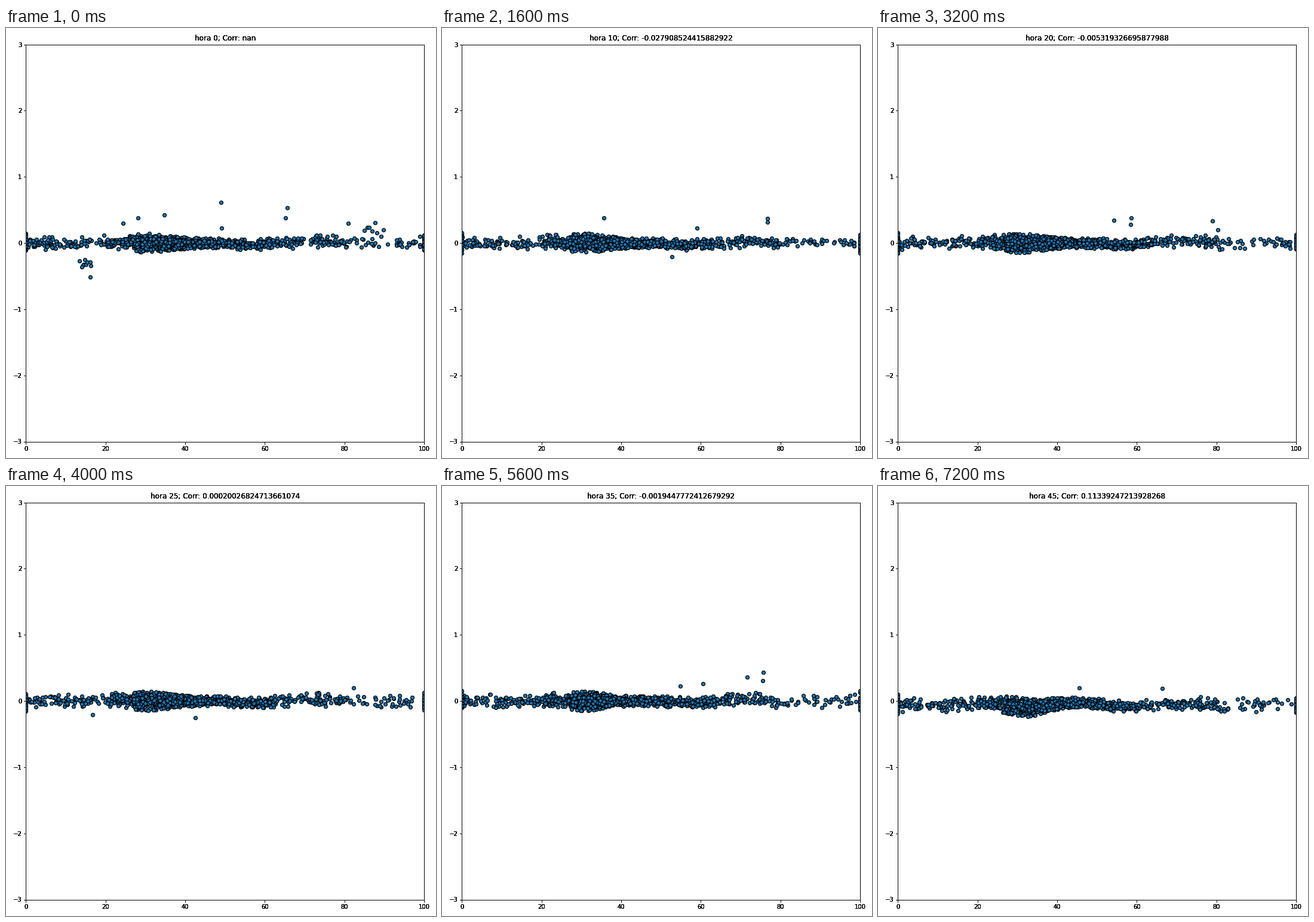
A matplotlib script that plays this animation: 720x720 px, repeating every 8 s.

```python
import numpy as np
import matplotlib.pyplot as plt
from matplotlib.animation import FuncAnimation

SIZE, DPI = 720, 72
LEFT, RIGHT, TOP, BOTTOM = 33.2, 700.2, 27.5, 692.5
LAYERS = 4  # stacked axes give the labels their heavy edges

CORR = ["nan", "-0.025353163349535673", "-0.027908524415882922",
        "-0.016482075931640857", "-0.005319326695877988",
        "0.00020026824713661074", "-0.0010739482615530418",
        "-0.0019447772412679292", "0.028316409527718364",
        "0.11339247213928268"]
LAST = len(CORR) - 1

# Most distant stray points; steps left out have none
STRAYS = {
    0: [(49, .61), (65.6, .53), (65.2, .38), (34.7, .42), (28.1, .38),
        (24.4, .3), (80.9, .3), (49.1, .23), (16.1, -.51)],
    1: [(27, .33), (27.7, .24), (73.5, .25), (15.3, -.25), (57.6, -.2)],
    2: [(35.6, .38), (76.7, .37), (76.7, .32), (59.1, .23), (52.8, -.21)],
    4: [(54.3, .34), (58.6, .38), (58.5, .28), (79, .33), (80.3, .2)],
    5: [(82.3, .2), (42.6, -.25), (16.8, -.21)],
    7: [(54.9, .23), (60.6, .26), (71.7, .36), (75.7, .43), (75.6, .31)],
    LAST: [(45.6, .2), (66.4, .19)],
}


def bump(x, centre, width):
    return np.exp(-((x - centre) / width) ** 2)


def cloud(step):
    rng = np.random.default_rng(40 + step)
    edges = [0, 20, 27, 37, 46, 52, 62, 80, 99]
    counts = [95, 85, 520, 330, 130, 130, 105, 42]
    x = np.concatenate([rng.uniform(a, b, n)
                        for a, b, n in zip(edges, edges[1:], counts)])
    rng.shuffle(x)
    core = 38.5 - 4 * bump(step, 7, 1.5)
    x = np.concatenate([x, rng.normal(core, 1.8, 220),
                        np.zeros(45), np.full(28, 100.)])

    spread = .045 + .018 * bump(x, 31, 5) - .012 * bump(x, 45, 9)
    spread -= .008 * bump(x, 60, 10)
    spread[(x == 0) | (x == 100)] = .068
    mean = (.02 * bump(x, 22, 4) - .025 * bump(x, 57, 5)
            + .03 * bump(x, 72, 6))
    if step == LAST:
        mean += -.055 - .045 * bump(x, 33, 4) + .035 * bump(x, 45, 6)
    y = mean + spread * np.clip(rng.normal(size=x.size), -2.3, 2.3)

    points = [np.column_stack([x, y])]
    if step in STRAYS:
        points.append(STRAYS[step])
    if step == 0:
        for low, high, level, n in [(10, 17, -.31, 9), (85, 90, .2, 7)]:
            points.append(np.column_stack([rng.uniform(low, high, n),
                                           rng.normal(level, .04, n)]))
    return np.vstack(points)


fig = plt.figure(figsize=(SIZE / DPI, SIZE / DPI), dpi=DPI, facecolor="white")
box = [LEFT / SIZE, 1 - BOTTOM / SIZE,
       (RIGHT - LEFT) / SIZE, (BOTTOM - TOP) / SIZE]
layers = [fig.add_axes(box, label=str(k), facecolor="none",
                       xlim=(0, 100), ylim=(-3, 3)) for k in range(LAYERS)]
titles = [ax.set_title("", fontsize=12, pad=6) for ax in layers]
dots = layers[0].scatter([], [], s=36, c="#1f77b4", edgecolors="black",
                         linewidths=1.2)
clouds = [cloud(step) for step in range(len(CORR))]


def draw(step):
    dots.set_offsets(clouds[step])
    for title in titles:
        title.set_text(f"hora {5 * step}; Corr: {CORR[step]}")
    return [dots, *titles]


anim = FuncAnimation(fig, draw, frames=len(CORR), interval=800,
                     repeat=True, repeat_delay=0, blit=False)
plt.show()
```
